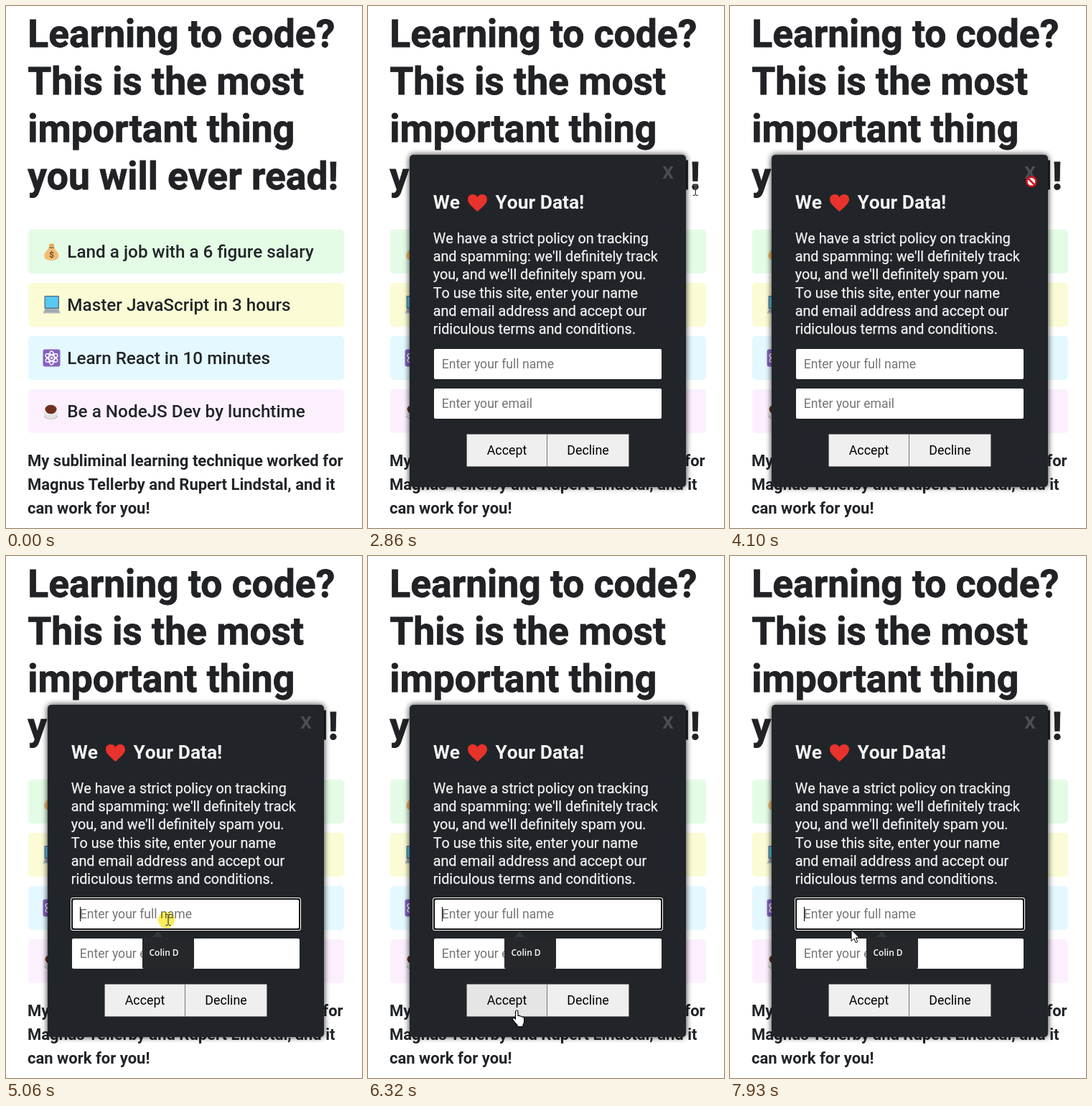
An HTML page for the animation above (8 s loop, 496 by 726 pixels).

```html
<!DOCTYPE html>
<html lang="en">
<head>
<meta charset="utf-8">
<title>Consent popup</title>
<style>
  html, body { margin: 0; width: 100%; height: 100%; overflow: hidden; background: #fff; }
  svg { display: block; width: 100%; height: 100%; font-family: Roboto, Arial, sans-serif; }
  .title { font-size: 53.4px; font-weight: 700; fill: #212225; stroke: #212225; stroke-width: .8px; }
  .item { font-size: 24.27px; font-weight: 500; fill: #212529; }
  .note { font-size: 22px; font-weight: 700; fill: #212529; }
  .head { font-size: 26.4px; font-weight: 700; fill: #f4f4f4; font-kerning: none; }
  .body { font-size: 19.8px; fill: #f2f2f2; stroke: #f2f2f2; stroke-width: .25px; font-kerning: none; }
  .hint { font-size: 17.6px; fill: #757575; }
  .label { font-size: 17.8px; fill: #000; text-anchor: middle; }
  .tip { font: 600 12px "Open Sans", "Noto Sans", sans-serif; fill: #fff; }
  .glow { mix-blend-mode: multiply; }
</style>
</head>
<body>
<svg viewBox="0 0 496 726" xmlns="http://www.w3.org/2000/svg">
  <defs>
    <filter id="blur" x="-10%" y="-10%" width="120%" height="120%">
      <feGaussianBlur stdDeviation="4.5"/>
    </filter>
  </defs>

  <g id="page"></g>

  <!-- money bag -->
  <g>
    <path d="M61 336Q53.500 342 53 347.500Q53 354 63.500 354Q73.500 354 73.500 347.500Q73 342 66 336Z" fill="#f3bc74"/>
    <path d="M59.500 331Q61.500 332 63.500 330Q65.500 332 67.500 331L66 335.500H61Z" fill="#e9a959"/>
    <path d="M60.500 336.200H66.500" stroke="#a87638" stroke-width="1.800" stroke-linecap="round"/>
    <text x="63.500" y="350" font-size="11.500" font-weight="700" fill="#6b4a22" text-anchor="middle">$</text>
  </g>
  <!-- laptop -->
  <g>
    <rect x="53.500" y="403" width="20.500" height="18" rx="1" fill="#5b6670"/>
    <rect x="54.700" y="404.200" width="18" height="15.500" fill="#58c8f4"/>
    <path d="M54 421H73.500L76 427.500H51.500Z" fill="#b4bcc2"/>
    <path d="M55 423H72.500M54 425H73.500" stroke="#7b858c" stroke-width="1" stroke-dasharray="1.500 .7"/>
  </g>
  <!-- atom -->
  <g fill="none" stroke="#fff" stroke-width="1.400">
    <rect x="51.500" y="477.500" width="24" height="24" rx="3" fill="#8661c1" stroke="none"/>
    <ellipse cx="63.500" cy="489.500" rx="9.500" ry="3.800" transform="rotate(30 63.500 489.500)"/>
    <ellipse cx="63.500" cy="489.500" rx="9.500" ry="3.800" transform="rotate(90 63.500 489.500)"/>
    <ellipse cx="63.500" cy="489.500" rx="9.500" ry="3.800" transform="rotate(150 63.500 489.500)"/>
    <circle cx="63.500" cy="489.500" r="1.700" fill="#fff" stroke="none"/>
  </g>
  <!-- coffee -->
  <g>
    <ellipse cx="62.500" cy="571" rx="9.500" ry="4" fill="#c9c9cc"/>
    <path d="M52.500 561Q53 574 62.500 574Q72 574 72.500 561Z" fill="#e4e2e3"/>
    <ellipse cx="62.500" cy="561" rx="10" ry="8" fill="#f2f0f0"/>
    <ellipse cx="62.500" cy="561" rx="8" ry="6.300" fill="#6e2f23"/>
  </g>

  <g id="modal">
    <rect x="58" y="207" width="385" height="462" rx="5" opacity=".85" filter="url(#blur)"/>
    <rect x="58" y="207" width="385" height="462" rx="5" fill="#212529"/>
    <text x="418" y="240" font-size="24.500" font-weight="700" fill="#4b4e52" text-anchor="middle">X</text>
    <path d="M152.500 286C145 279 139 274.500 139 269C139 264.500 142 262 146 262C149 262 151.500 263.500 152.500 266C153.500 263.500 156 262 159 262C163 262 166 264.500 166 269C166 274.500 160 279 152.500 286Z" fill="#e8322c"/>
    <g id="copy"></g>

    <g id="ring">
      <rect x="90" y="475" width="321" height="46" rx="3.500" fill="#fff"/>
      <rect x="91" y="476" width="319" height="44" rx="2.500" fill="#101010"/>
    </g>
    <rect id="field" x="92" y="477" width="317" height="42" rx="2" fill="#fff"/>
    <rect x="92" y="532" width="317" height="42" rx="2" fill="#fff"/>
    <text class="hint" x="102.800" y="504">Enter your full name</text>
    <text class="hint" x="102.800" y="559">Enter your email</text>
    <rect id="caret" x="103" y="488" width="1" height="20" fill="#000"/>

    <g id="tooltip">
      <path d="M203 531L211.500 522L220 531Z" fill="#33363a"/>
      <rect x="190" y="530" width="72" height="44" rx="2" fill="#25272b"/>
      <text class="tip" x="199.500" y="556">Colin D</text>
    </g>

    <g stroke="#767676">
      <rect id="left" x="137.500" y="595.500" width="111.500" height="45" rx="1"/>
      <rect id="right" x="249" y="595.500" width="114.500" height="45" rx="1"/>
    </g>
    <text id="leftText" class="label" y="624"></text>
    <text id="rightText" class="label" y="624"></text>
  </g>

  <circle id="glow" class="glow" cx="223.500" cy="506" r="11.500" fill="#fbee58"/>
  <g id="cursor">
    <path id="arrow" d="M0 0V16L3.800 12.500L6.300 18.300L8.800 17.200L6.300 11.600H11.300Z" fill="#fff" stroke="#000" stroke-width="1"/>
    <g id="beam" fill="none">
      <path d="M-3.500 -7.500H3.500M0 -7.500V7.500M-3.500 7.500H3.500" stroke="#fff" stroke-opacity=".5" stroke-width="2.400"/>
      <path d="M-3.500 -7.500H-1L0 -6.500L1 -7.500H3.500M0 -6.500V6.500M-3.500 7.500H-1L0 6.500L1 7.500H3.500" stroke="#000" stroke-width="1"/>
    </g>
    <g id="deny" stroke="#d3121c" stroke-width="2.600">
      <circle r="6.600" fill="#fff"/>
      <path d="M-4.600 -4.600L4.600 4.600"/>
    </g>
    <path id="hand" d="M-2 1.500Q-2 0 -.3 0Q1.500 0 1.500 1.500V7.500Q3.500 6.500 4.600 8.200Q6.400 7.400 7.400 9.200Q10 8.600 10 11V16Q10 18 8.500 20V22.500H.5V20.500Q-2 18 -5.800 12.800Q-6.500 11 -4.800 10.500Q-3.500 10.300 -2 12.200Z" fill="#fff" stroke="#000" stroke-width="1.100" stroke-linejoin="round"/>
  </g>
</svg>

<script>
const LOOP = 8000;
const $ = id => document.getElementById(id);

function add(parent, tag, attrs, text = "") {
  const el = document.createElementNS("http://www.w3.org/2000/svg", tag);
  for (const key in attrs) el.setAttribute(key, attrs[key]);
  el.textContent = text;
  parent.append(el);
}

function lines(parent, cls, x, y, step, list) {
  list.forEach((text, i) => add(parent, "text", { class: cls, x, y: y + i * step }, text));
}

["#e4fce6", "#fbfcd5", "#e4f8ff", "#fcf0ff"].forEach((fill, i) =>
  add($("page"), "rect", { x: 31, y: 311 + i * 74, width: 440, height: 61, rx: 5, fill }));
lines($("page"), "title", 30.3, 57.2, 66,
  ["Learning to code?", "This is the most", "important thing", "you will ever read!"]);
lines($("page"), "item", 85.3, 350, 74, [
  "Land a job with a 6 figure salary", "Master JavaScript in 3 hours",
  "Learn React in 10 minutes", "Be a NodeJS Dev by lunchtime"]);
lines($("page"), "note", 30, 640, 33, [
  "My subliminal learning technique worked for",
  "Magnus Tellerby and Rupert Lindstal, and it", "can work for you!"]);

lines($("copy"), "head", 90.7, 282, 0, ["We"]);
lines($("copy"), "head", 177.5, 282, 0, ["Your Data!"]);
lines($("copy"), "body", 90.7, 330, 25.2, [
  "We have a strict policy on tracking", "and spamming: we'll definitely track",
  "you, and we'll definitely spam you.", "To use this site, enter your name",
  "and email address and accept our", "ridiculous terms and conditions."]);

// pointer path: time, x, y
const path = [
  [2200, 352, 570], [2410, 252, 390], [2590, 214, 480], [2730, 310, 390], [2860, 456, 256],
  [2990, 488, 228], [3280, 421, 262], [3410, 412, 262], [3620, 424, 268], [3830, 418, 240],
  [3970, 419, 238], [4100, 420, 244], [4240, 405, 275], [4450, 300, 420], [4650, 227, 506],
  [4870, 226, 506], [5260, 226, 506], [5530, 252, 550], [5800, 292, 606], [6120, 285, 620],
  [6190, 285, 620], [6320, 207.5, 632], [6600, 207.5, 632], [6790, 278, 627], [7000, 278, 627],
  [7130, 222, 627], [7200, 222, 627], [7340, 276, 627], [7470, 276, 627], [7600, 226, 620],
  [7930, 169, 519.5], [8000, 169, 519.5]
];
const swaps = [5800, 6260, 6720, 7110, 7270, 7570];
const blinks = [5060, 5590, 6120, 6660, 7190, 7600, 7930];

const passed = (times, t) => times.filter(v => t >= v).length;
const inside = (p, x, y, w, h) => p[0] >= x && p[0] < x + w && p[1] >= y && p[1] < y + h;

function pointerAt(t) {
  const i = Math.max(1, path.findIndex(k => k[0] > t));
  const [t0, x0, y0] = path[i - 1], [t1, x1, y1] = path[i];
  const k = (t - t0) / (t1 - t0);
  return [x0 + (x1 - x0) * k, y0 + (y1 - y0) * k];
}

function shapeAt(p) {
  if (inside(p, 137, 595, 227, 46)) return "hand";
  if (inside(p, 403, 219, 30, 30)) return "deny";
  const typed = inside(p, 92, 477, 317, 42) || inside(p, 92, 532, 317, 42);
  const copy = inside(p, 91, 311, 318, 150);
  const title = inside(p, 443, 207, 25, 62);
  return typed || copy || title ? "beam" : "arrow";
}

const show = (id, on) => $(id).setAttribute("visibility", on ? "inherit" : "hidden");

function draw(t) {
  const p = pointerAt(Math.max(t, 2200));
  const active = t >= 2200, focused = t >= 5060;
  const shape = shapeAt(p);

  show("modal", t >= 1330);
  show("ring", focused);
  show("tooltip", focused);
  show("caret", passed(blinks, t) % 2 === 1);
  show("glow", focused && t < 5190);
  show("cursor", active);
  for (const id of ["arrow", "beam", "deny", "hand"]) show(id, id === shape);
  $("cursor").setAttribute("transform", `translate(${p[0]} ${p[1]})`);

  const inset = focused ? 1 : 0;
  const field = { x: 92 + inset, y: 477 + inset, width: 317 - 2 * inset, height: 42 - 2 * inset };
  for (const key in field) $("field").setAttribute(key, field[key]);

  const labels = ["Accept", "Decline"];
  if (passed(swaps, t) % 2) labels.reverse();
  const split = labels[0] === "Accept" ? 249.5 : 251.5;
  $("left").setAttribute("width", split - 137.5);
  $("right").setAttribute("x", split);
  $("right").setAttribute("width", 363.5 - split);
  [["left", 137.5, split], ["right", split, 363.5]].forEach(([id, a, b], i) => {
    const hover = active && inside(p, a, 595, b - a, 46);
    $(id).setAttribute("fill", hover ? "#e5e5e5" : "#efefef");
    $(id + "Text").setAttribute("x", (a + b) / 2);
    $(id + "Text").textContent = labels[i];
  });
}

const start = performance.now();
function tick() {
  draw((performance.now() - start) % LOOP);
  requestAnimationFrame(tick);
}
tick();
</script>
</body>
</html>
```
